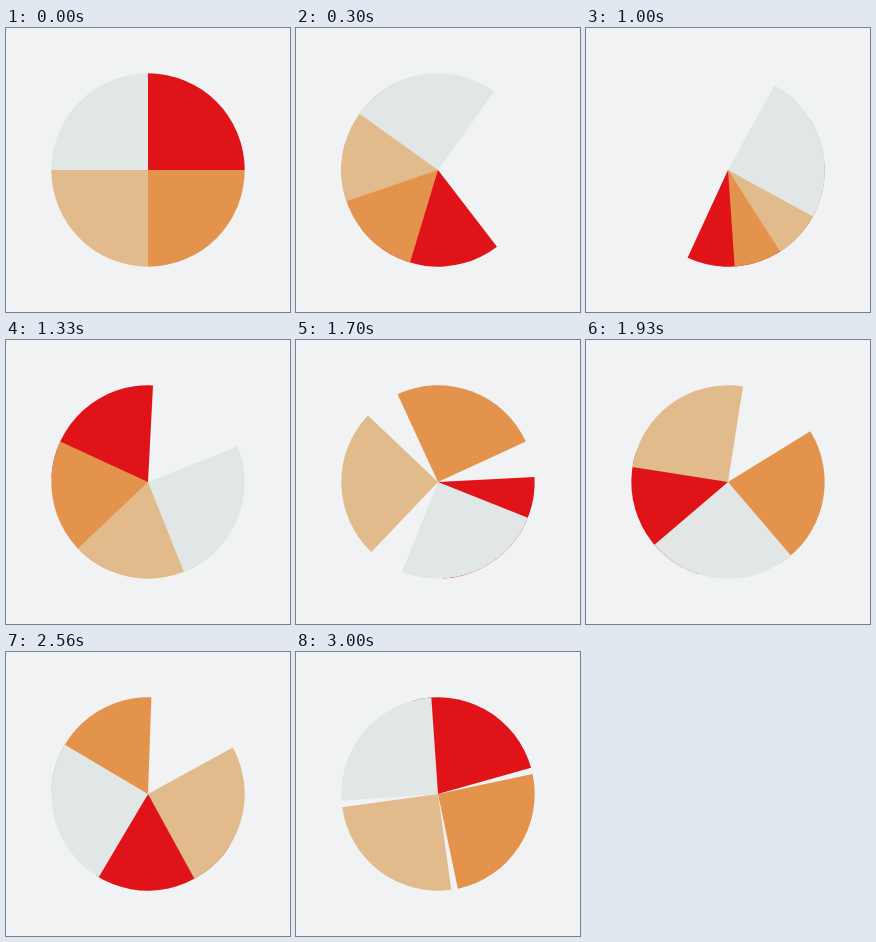
Animation of 284 by 284 pixels, one loop 3030 ms. Source, as an HTML page:

```html
<!DOCTYPE html>
<html lang="en">
<head>
<meta charset="utf-8">
<title>Quarter slices</title>
<style>
  html, body { margin: 0; width: 100%; height: 100%; overflow: hidden; background: #f0f2f4; }
  svg { display: block; width: 100vw; height: 100vh; }
</style>
</head>
<body>
<svg viewBox="0 0 284 284"></svg>
<script>
  const LOOP = 3030, STEPS = 91, CENTER = 142, RADIUS = 96.7;

  // Later slices lie on top; each makes whole turns per loop.
  const slices = [
    { color: '#e01418', start: 0, turns: 4 },
    { color: '#e4934c', start: 90, turns: 3 },
    { color: '#e1bb8b', start: 180, turns: 2 },
    { color: '#e0e7e6', start: 270, turns: 1 }
  ];

  const svg = document.querySelector('svg');
  for (const slice of slices) {
    const path = document.createElementNS('http://www.w3.org/2000/svg', 'path');
    path.setAttribute('d', `M0 0V${-RADIUS}A${RADIUS} ${RADIUS} 0 0 1 ${RADIUS} 0Z`);
    path.setAttribute('fill', slice.color);
    slice.path = svg.appendChild(path);
  }

  // 30 steps per second, each starting on a 10 ms tick.
  function stepAt(ms) {
    const tick = Math.floor((ms % LOOP) / 10) * 10;
    return Math.floor((tick + 3.4) * 0.03);
  }

  function draw(ms) {
    const progress = stepAt(ms) / STEPS;
    for (const { path, start, turns } of slices) {
      const angle = (start + 360 * turns * progress) % 360;
      path.setAttribute('transform', `translate(${CENTER} ${CENTER}) rotate(${angle})`);
    }
  }

  const begin = performance.now();
  function tick() {
    draw(performance.now() - begin);
    requestAnimationFrame(tick);
  }
  tick();
</script>
</body>
</html>
```
